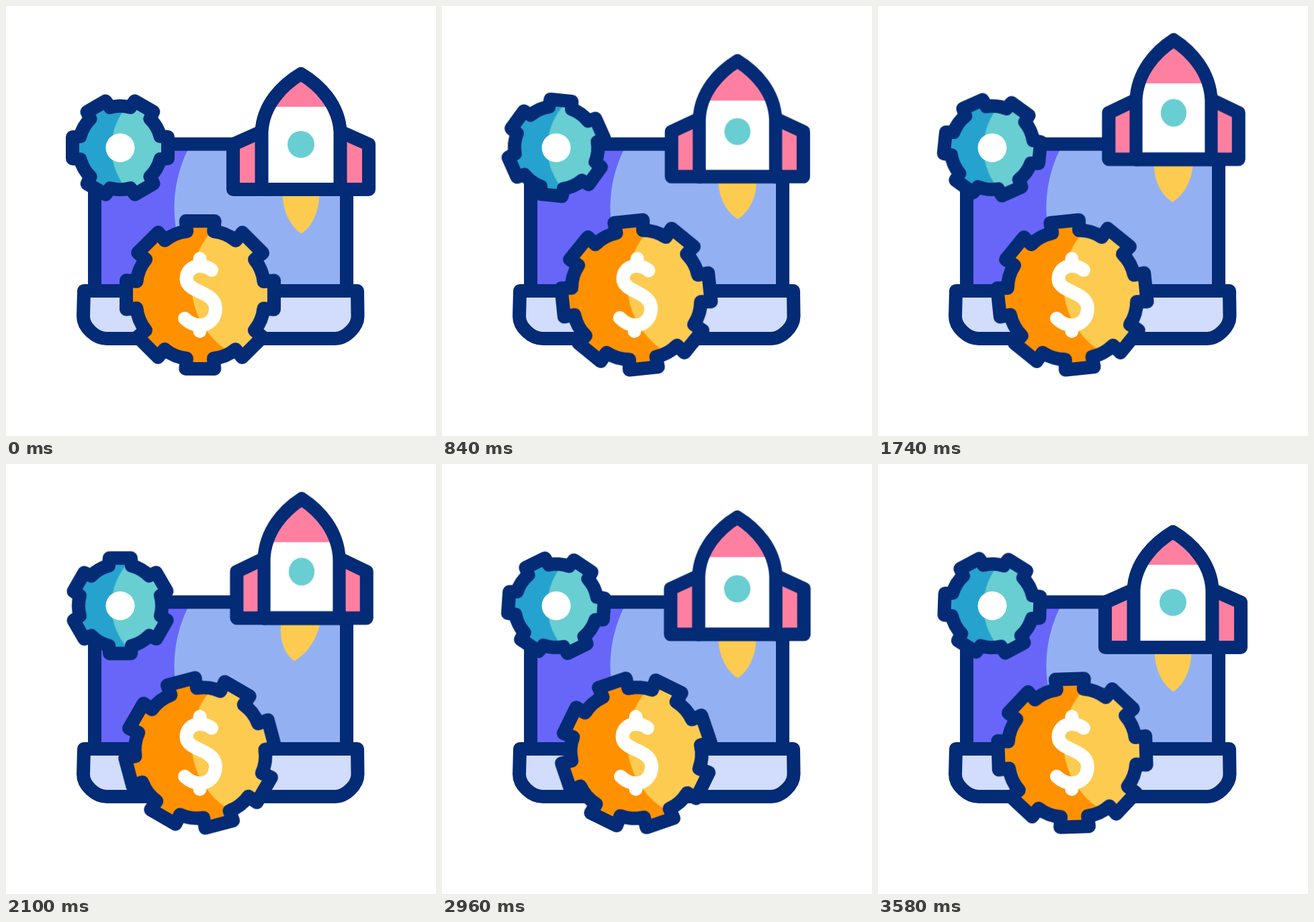
Animation of 640x640 px, one loop 3.6 s. Source, as an HTML page:

```html
<!DOCTYPE html>
<html lang="en">
<head>
<meta charset="utf-8">
<title>Launch</title>
<style>
  html, body { margin: 0; width: 100%; height: 100%; overflow: hidden; background: #fff; }
  svg { display: block; width: 640px; height: 640px; }

  .line { stroke: #042b76; stroke-width: 20; stroke-linejoin: round; stroke-linecap: round; }
  .hollow { fill: none; }
  .ship .line { vector-effect: non-scaling-stroke; }

  .cw, .ccw, .ship, .nose, .flame, .sway, .rock {
    transform-origin: 0 0;
    animation: 3.6s linear infinite;
  }
  .cw { animation-name: cw; }
  .ccw { animation-name: ccw; }
  .ship, .nose, .flame { animation-timing-function: cubic-bezier(.33, 0, .38, 1); }
  .ship { animation-name: ship; }
  .nose { animation-name: nose; }
  .flame { animation-name: flame; }
  .sway, .rock { animation-timing-function: cubic-bezier(.37, 0, .63, 1); }
  .sway { animation-name: sway; }
  .rock { animation-name: rock; }

  @keyframes cw { to { transform: rotate(360deg); } }
  @keyframes ccw { to { transform: rotate(-360deg); } }

  /* crouch, lift off, hover three times, settle */
  @keyframes ship {
    0%, 91.667%, 100% { transform: translate(439px, 273px) scale(1, 1); }
    13.889% { transform: translate(439px, 308.4px) scale(1, .942); }
    33.333%, 47.222%, 61.111%, 75% { transform: translate(440px, 226.8px) scale(.957, 1.032); }
    40.278%, 54.167%, 68.056% { transform: translate(440px, 241px) scale(.957, 1.032); }
  }
  @keyframes nose {
    0%, 100% { transform: translateY(0); }
    13.889% { transform: translateY(3px); }
    33.333%, 75% { transform: translateY(13.5px); }
  }
  @keyframes flame {
    0%, 13.889%, 91.667%, 100% { transform: scale(1, 1); }
    33.333%, 75% { transform: scale(1.1, .935); }
  }
  @keyframes sway {
    0%, 76.57%, 100% { transform: skewX(0deg); }
    27.95% { transform: skewX(0deg); animation-timing-function: cubic-bezier(.39, .575, .565, 1); }
    31.42%, 45.31%, 59.2% { transform: skewX(-10deg); }
    38.36%, 52.25%, 66.14% { transform: skewX(10deg); }
    73.09% { transform: skewX(-10deg); animation-timing-function: cubic-bezier(.47, 0, .745, .715); }
  }
  @keyframes rock {
    0%, 41.67%, 100% { transform: rotate(0deg); }
    11.11% { transform: rotate(0deg); animation-timing-function: cubic-bezier(.39, .575, .565, 1); }
    18.75% { transform: rotate(3.7deg); }
    34.03% { transform: rotate(-3.7deg); animation-timing-function: cubic-bezier(.47, 0, .745, .715); }
  }
</style>
</head>
<body>
<svg viewBox="0 0 640 640">
  <defs>
    <path id="cog"/>
    <path id="coin"/>
    <path id="hull" d="M-58.5 0V-85C-57-126-27-156 0-172C27-156 57-126 58.5-85V0Z"/>
    <path id="fin" d="M-58.5 0H-101V-67L-58.5-86Z"/>
    <clipPath id="inCog"><use href="#cog"/></clipPath>
    <clipPath id="inCoin"><use href="#coin"/></clipPath>
    <clipPath id="inHull"><use href="#hull"/></clipPath>
    <clipPath id="inScreen"><rect x="132" y="205" width="375" height="219"/></clipPath>
  </defs>

  <g id="laptop">
    <rect x="132" y="205" width="375" height="219" fill="#6866f9"/>
    <circle cx="445" cy="300" r="194.5" fill="#93b1f2" clip-path="url(#inScreen)"/>
    <rect x="132" y="205.5" width="375" height="218.5" class="line hollow"/>
    <path class="line" fill="#d2dcfc" d="M116 424H523L523.5 462C523.5 478 505 495 490 495H150C133 495 115 478 115 462Z"/>
  </g>

  <g transform="translate(170 211)">
    <g class="ccw">
      <use href="#cog" fill="#26a2ce"/>
      <g clip-path="url(#inCog)"><g class="cw"><circle cx="82" r="95" fill="#68ced2"/></g></g>
      <use href="#cog" class="line hollow"/>
    </g>
    <circle r="21.5" fill="#fff"/>
  </g>

  <g class="ship">
    <g class="flame"><path class="sway" fill="#fdcb50" d="M-27.5 0C-28.5 30-17 54 .5 66C18 54 28.5 30 27.5 0Z"/></g>
    <use href="#fin" fill="#ff7fa1"/>
    <use href="#fin" fill="#ff7fa1" transform="scale(-1 1)"/>
    <path class="line hollow" d="M-58.5 0H-101V-67L-58.5-86M58.5 0H101V-67L58.5-86"/>
    <use href="#hull" fill="#fff"/>
    <g clip-path="url(#inHull)"><rect class="nose" x="-70" y="-260" width="140" height="137" fill="#ff7fa1"/></g>
    <use href="#hull" class="line hollow"/>
    <circle cy="-67" r="20" fill="#68ced2"/>
  </g>

  <g transform="translate(289 430)">
    <g class="cw">
      <use href="#coin" fill="#ff9100"/>
      <g clip-path="url(#inCoin)"><g class="ccw"><circle cx="105" cy="-16" r="118" fill="#fdcb50"/></g></g>
      <use href="#coin" class="line hollow"/>
    </g>
    <path class="rock" fill="none" stroke="#fff" stroke-width="20" stroke-linecap="round" stroke-linejoin="round"
      d="M17-37C11-42 4-43-1-43C-13-43-20.5-34-20.5-24C-20.5-3 23-6 23 20C23 36 12 45 0 45C-9 45-17 41-23 35M-.5-54V-43M-.5 45V54"/>
  </g>
</svg>
<script>
  // tip and root: distance from the centre and half width of a tooth
  function gear(id, teeth, tip, root, bulge) {
    const at = (turn, [r, w]) => {
      const c = Math.cos(turn), s = Math.sin(turn);
      return (r * c - w * s).toFixed(2) + ' ' + (r * s + w * c).toFixed(2);
    };
    let d = '';
    for (let i = 0; i < teeth; i++) {
      const a = i * 2 * Math.PI / teeth;
      const start = at(a, [root[0], -root[1]]);
      d += (i ? `A${bulge} ${bulge} 0 0 1 ` : 'M') + start +
        'L' + at(a, [tip[0], -tip[1]]) + 'L' + at(a, tip) + 'L' + at(a, root);
    }
    d += `A${bulge} ${bulge} 0 0 1 ${root[0]} ${-root[1]}Z`;
    document.getElementById(id).setAttribute('d', d);
  }
  gear('cog', 6, [71, 16], [59.5, 17], 55);
  gear('coin', 8, [110, 21.5], [94.5, 20], 60);
</script>
</body>
</html>
```
